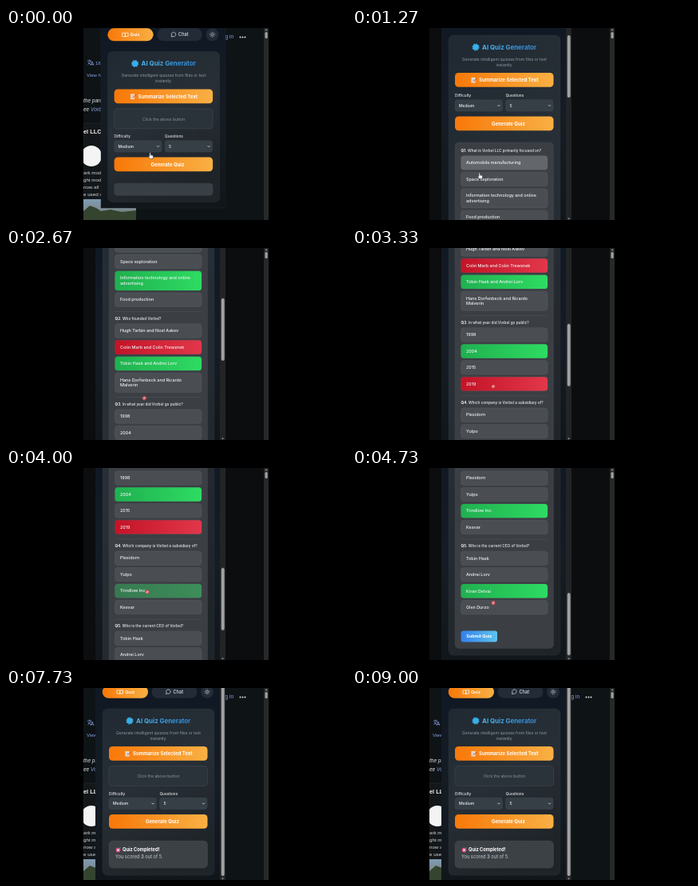
Write an HTML page that moves like this. It is 426x240 px and loops after 9070 ms.

```html
<!DOCTYPE html>
<html lang="en">
<head>
<meta charset="utf-8">
<title>Quiz popup</title>
<style>
  html, body { margin: 0; width: 100%; height: 100%; overflow: hidden; background: #000; }
  svg { display: block; width: 100%; height: 100%; }
  text { font-family: Inter, "Open Sans", sans-serif; white-space: pre; }
  .page text { font-family: "Liberation Sans", Arial, sans-serif; }
  .soft { filter: blur(.35px); }
</style>
</head>
<body>
<svg id="stage" viewBox="0 0 426 240">
  <defs>
    <linearGradient id="orange"><stop stop-color="#f87808"/><stop offset="1" stop-color="#f9b044"/></linearGradient>
    <linearGradient id="green"><stop stop-color="#20b050"/><stop offset="1" stop-color="#2edc62"/></linearGradient>
    <linearGradient id="red"><stop stop-color="#c31327"/><stop offset="1" stop-color="#e2374a"/></linearGradient>
    <linearGradient id="blue"><stop stop-color="#3480ea"/><stop offset="1" stop-color="#5cc4ee"/></linearGradient>
    <linearGradient id="title"><stop stop-color="#48b4ee"/><stop offset="1" stop-color="#2f86d4"/></linearGradient>
    <linearGradient id="panel" x2="0" y2="1"><stop stop-color="#101824"/><stop offset=".5" stop-color="#151c24"/><stop offset="1" stop-color="#11161b"/></linearGradient>
    <linearGradient id="card" x2=".4" y2="1"><stop stop-color="#202932"/><stop offset=".5" stop-color="#282f36"/><stop offset="1" stop-color="#1f2429"/></linearGradient>
    <linearGradient id="photo" x2="0" y2="1"><stop stop-color="#7f9bb4"/><stop offset=".5" stop-color="#7d8c90"/><stop offset="1" stop-color="#39452f"/></linearGradient>
    <clipPath id="window"><rect x="97" width="232" height="240"/></clipPath>
  </defs>
</svg>
<script>
const LOOP = 9070, QUIZ_AT = 830, RESULT_AT = 5700;
let css = '';

// Adds a looping keyframe track and returns the style that uses it.
function track(name, points, toCss, timing = 'linear') {
  const all = [...points, [LOOP, points[points.length - 1][1]]];
  const steps = all.map(([ms, v]) => `${(ms / LOOP * 100).toFixed(3)}%{${toCss(v)}}`);
  css += `@keyframes ${name}{${steps.join('')}}`;
  return `style="animation:${name} ${LOOP}ms ${timing} infinite"`;
}
const fade = v => `opacity:${v}`;
const shiftY = y => `transform:translateY(${y}px)`;
const move = ([x, y]) => `transform:translate(${x}px,${y}px)`;
const shown = (name, spans) =>
  track(name, [[0, 0], ...spans.flatMap(([a, b]) => [[a, 1], [b, 0]])]
    .filter(([ms], i) => i || spans[0][0] > 0), fade, 'step-end');

const rect = (x, y, w, h, r, fill, more = '') =>
  `<rect x="${x}" y="${y}" width="${w}" height="${h}" rx="${r}" fill="${fill}" ${more}/>`;
const label = (x, cy, str, size, fill = '#e8eaec', more = '') =>
  `<text x="${x}" y="${cy + size * .36}" font-size="${size}" fill="${fill}" ${more}>${str}</text>`;
const path = (d, stroke, width = .7) =>
  `<path d="${d}" fill="none" stroke="${stroke}" stroke-width="${width}"/>`;
const BOLD = 'font-weight="700"', MEDIUM = 'font-weight="500"', MID = 'text-anchor="middle"';

function browserPage() {
  const lines = ['ark mode', 'ght mode', 'now all', 'e used si']
    .map((s, i) => label(97, 181 + i * 9, s, 6.2, '#d4d6d8')).join('');
  return rect(97, 0, 226, 240, 0, '#0e1316') +
    path('M102 41h5m-2.5-1.5v1.5m2 0q-1 3-4 4.5m.3-3q1 2 3 3M106 47l2-5 2 5m-3.3-1.5h2.6', '#7f97d8', .8) +
    label(112, 43.5, '18', 6, '#88a3e8') +
    label(101, 59, 'View hi', 6, '#88a3e8') +
    label(97, 91, 'the pare', 6.5, '#e0e2e4', 'font-style="italic"') +
    label(97, 102, 'ee <tspan fill="#88a3e8">Vorb</tspan>', 6.5, '#e0e2e4', 'font-style="italic"') +
    rect(97, 119, 26, 105, 0, '#13171a', 'stroke="#2a3035" stroke-width=".5"') +
    label(97, 129, 'el LLC', 7.4, '#eceeef', BOLD) +
    '<circle cx="107" cy="160" r="13" fill="#f4f4f4"/>' + lines +
    rect(97, 214, 66, 26, 0, 'url(#photo)') +
    '<path d="M97 229l8-7 8 3 6 4 12-2 14 3 18-2v12H97z" fill="#35442f"/>' +
    label(274.5, 11, 'g in', 6.6, '#88a3e8') +
    [293.5, 296.5, 299.5].map(x => `<circle cx="${x}" cy="11.5" r="1" fill="#dfe1e3"/>`).join('');
}

function header() {
  return rect(120.7, -3.2, 57.3, 16, 8, 'url(#orange)') +
    path('M139 2.7h3q.7 0 .7.7v4.3q0-.7-.7-.7h-3zM146.5 2.7h-3q-.7 0-.7.7v4.3q0-.7.7-.7h3z', '#fff') +
    label(149, 4.9, 'Quiz', 5.4, '#fff', 'font-weight="600"') +
    rect(182.5, -3.2, 57, 16, 8, '#222b36') +
    path('M200.500 7.5l.5-1.7a2.7 2.7 0 1 1 1.3 1.2z', '#dfe3e8') +
    label(209.5, 4.9, 'Chat', 5.6, '#dfe3e8', MEDIUM) +
    '<circle cx="252" cy="4.8" r="8" fill="#222b36"/>' +
    '<circle cx="252" cy="4.8" r="1.5" fill="none" stroke="#dfe3e8" stroke-width=".7"/>' +
    '<circle cx="252" cy="4.8" r="3.1" fill="none" stroke="#dfe3e8" stroke-dasharray=".7 1.735"/>';
}

function select(x, y, name, value) {
  return label(x, y - 12.5, name, 4.7, '#e4e7ea', MEDIUM) +
    rect(x, y - 7.2, 59.5, 14.2, 3, '#363e46', 'stroke="#444c53" stroke-width=".4"') +
    label(x + 5, y, value, 5, '#f0f2f3', MEDIUM) +
    path(`M${x + 53.5} ${y - .8}l1.5 1.5 1.5-1.5`, '#dfe3e6', .8);
}

function form(cardEnd, withDropBox) {
  const up = withDropBox ? 0 : -30.5;
  return header() +
    rect(121, 26, 140, cardEnd - 26, 6, 'url(#card)', 'stroke="#2d353c" stroke-width=".4"') +
    '<circle cx="155" cy="41" r="3.8" fill="#38aee8"/>' +
    '<circle cx="155" cy="41" r="4" fill="none" stroke="#38aee8" stroke-width="1.2" stroke-dasharray="1.5 1.64"/>' +
    label(163, 41, 'AI Quiz Generator', 7.9, 'url(#title)', BOLD) +
    label(191, 56, 'Generate intelligent quizzes from files or text', 5, '#929ba4', MID) +
    label(191, 63, 'instantly.', 5, '#929ba4', MID) +
    rect(129, 73, 123.5, 17.8, 4.5, 'url(#orange)') +
    rect(149.5, 79, 5, 6.5, .6, '#eee3d4') + path('M150.5 81h3m-3 1.5h3m-3 1.5h2', '#8a96a5', .5) +
    path('M152.5 84l3.5-4', '#d5413b', .9) +
    label(159, 82, 'Summarize Selected Text', 6, '#fff', BOLD) +
    (withDropBox ? rect(129, 97.5, 123.5, 24.8, 4, '#2b333a', 'stroke="#535c64" stroke-width=".6" stroke-dasharray="1.5 1"') +
      label(191, 110.2, 'Click the above button', 5, '#89929b', MID) : '') +
    `<g transform="translate(0 ${up})">` +
    select(129, 144.5, 'Difficulty', 'Medium') + select(192.5, 144.5, 'Questions', '5') +
    rect(129, 158, 123.5, 17.8, 4.5, 'url(#orange)') +
    '<path d="M169 163.5l-2.5 4h1.7l-1 3.5 3.3-4.5h-2z" fill="#e8952c"/>' +
    label(175, 167, 'Generate Quiz', 6, '#fff', BOLD) + '</g>';
}

const questions = [
  { at: 1620, ask: 'What is Vorbel LLC primarily focused on?', right: 2,
    options: ['Automobile manufacturing', 'Space exploration', 'Information technology and online|advertising', 'Food production'] },
  { at: 2350, ask: 'Who founded Vorbel?', right: 2, wrong: 1,
    options: ['Hugh Tarbin and Noel Askev', 'Colin Marb and Colin Trewznek', 'Tobin Hask and Andrei Lorv', 'Hans Dorfenbeck and Ricardo|Malverin'] },
  { at: 3150, ask: 'In what year did Vorbel go public?', right: 1, wrong: 3,
    options: ['1998', '2004', '2015', '2019'] },
  { at: 3920, ask: 'Which company is Vorbel a subsidiary of?', right: 2,
    options: ['Plexidorn', 'Yulpo', 'Trindlow Inc.', 'Kesvar'] },
  { at: 4520, ask: 'Who is the current CEO of Vorbel?', right: 2,
    options: ['Tobin Hask', 'Andrei Lorv', 'Kiran Delvai', 'Glen Durzo'] },
];

function quizBody() {
  let out = rect(129, 160, 123.5, 552.5, 5, '#3b3f44', 'stroke="#44494e" stroke-width=".4"');
  let y = 170.4;
  questions.forEach((q, n) => {
    const marked = track('answer' + n, [[0, 0], [q.at, 0], [q.at + 180, 1]], fade);
    if (n) out += rect(136.5, y - 9, 108, .5, 0, '#53585d');
    out += label(136.5, y, `<tspan ${BOLD}>Q${n + 1}.</tspan> ${q.ask}`, 4.7, '#eceef0', MEDIUM);
    let top = y + 6.4;
    q.options.forEach((option, i) => {
      const lines = option.split('|'), h = lines.length > 1 ? 24.2 : 17.4;
      out += rect(136.5, top, 108.5, h, 3.5, '#4a4e53', 'stroke="#575c61" stroke-width=".5"');
      if (!n && !i) out += rect(136.5, top, 108.5, h, 3.5, '#666a6f',
        track('hover', [[0, 0], [1020, 0], [1130, 1], [1260, 1], [1400, 0]], fade));
      const tone = i === q.right ? 'green' : i === q.wrong ? 'red' : '';
      if (tone) out += rect(136.5, top, 108.5, h, 3.5, `url(#${tone})`, marked);
      lines.forEach((s, k) => {
        out += label(143, top + h / 2 - .2 + (k - (lines.length - 1) / 2) * 6.7, s, 5.4, '#f2f3f4', MEDIUM);
      });
      top += h + 3.05;
    });
    y = top + 12;
  });
  return out + rect(136.5, 690.5, 45.5, 14, 3, 'url(#blue)') +
    label(159.3, 697.4, 'Submit Quiz', 5.4, '#fff', `${BOLD} ${MID}`);
}

function scrollTrack() {
  return rect(268, 0, 7, 240, 0, '#222426') + '<path d="M270 237.5h3l-1.5 2z" fill="#9a9c9e"/>';
}

function result() {
  return rect(129, 191, 123.5, 34, 5, '#3c4146', 'stroke="#494f54" stroke-width=".4"') +
    '<circle cx="140.5" cy="202.5" r="2.9" fill="#e0457c"/><circle cx="140.5" cy="202.5" r="1.5" fill="#f3d5e0"/>' +
    path('M140.5 202.5l3-3', '#4aa5e0', .8) +
    label(146, 202.3, 'Quiz Completed!', 5.7, '#fff', BOLD) +
    label(137, 210.5, `You scored <tspan ${BOLD}>3</tspan> out of 5.`, 5.7, '#b4babf', MEDIUM);
}

function cursor() {
  const at = track('pointer', [
    [0, [181, 159.6]], [500, [181, 166]], [850, [176, 168]], [1270, [160, 184.500]], [1500, [168, 213]], [1720, [168, 213]],
    [2070, [171, 159]], [2280, [172, 193]], [2550, [172, 193]], [3000, [177, 173]], [3500, [177, 173]],
    [3820, [177, 155]], [4560, [177, 155]], [4730, [177, 168.5]], [5150, [160, 210]], [5600, [160, 210]],
    [6000, [167, 212]], [6700, [167, 212]], [7100, [190, 250]]], move);
  const blocked = [[1620, 2130], [2350, 2750], [3150, 3560], [3920, 4220], [4520, 4900]];
  const hand = [0, ...blocked.map(b => b[1])].map((from, i) => [from, blocked[i] ? blocked[i][0] : RESULT_AT]);
  return `<g ${at}>
    <path ${shown('hand', hand)} d="M-1.2-3.5q.8-.8 1.5 0v2.6l2.6.6q.8.3.7 1.2l-.5 2.9h-3.6l-2.4-2.7q.3-1 1.7-.2z" fill="#fff" stroke="#111" stroke-width=".5"/>
    <g ${shown('blocked', blocked)}><circle r="2.1" fill="#f4e9e9" stroke="#d3383c"/>${path('M-1.5-1.5l3 3', '#d3383c', 1)}</g>
    <g ${shown('beam', [[RESULT_AT, 7100]])}>${path('M-1.3-3h2.6M0-3v6m-1.3 0h2.6', '#e8e8e8')}</g></g>`;
}

const scroll = [[0, 0], [1000, 0], [1200, 17], [1750, 17], [2030, 120], [2550, 120], [2850, 291],
  [3520, 291], [3760, 387], [4150, 387], [4420, 487]];
const scrolled = track('scroll', scroll, s => shiftY(-s));
const thumb = track('thumb', scroll, s => shiftY(3.7 + .313 * s));

document.getElementById('stage').innerHTML += `<g clip-path="url(#window)"><g class="soft">
  ${rect(97, 0, 226, 240, 0, '#0c0d0e')}
  <g class="page" ${shown('page', [[0, QUIZ_AT], [RESULT_AT, LOOP]])}>${browserPage()}</g>
  ${rect(323, 0, 6, 240, 0, '#272929')}${rect(324.5, 5, 3.2, 8, 1.5, '#a0a2a3')}
  <path d="M324.6 3.3h3l-1.5-2.2z" fill="#a0a2a3"/>
  <g ${shown('start', [[0, QUIZ_AT]])}>
    ${rect(119, -4, 156, 229, 0, 'url(#panel)', 'stroke="#1d252d" stroke-width=".4"')}
    <g transform="translate(6.6 3.5)">${form(214, true)}${rect(129, 190.7, 123.5, 15, 4, '#383f45', 'stroke="#444b51" stroke-width=".4"')}</g>
  </g>
  <g ${shown('quiz', [[QUIZ_AT, RESULT_AT]])}>
    ${rect(112, 0, 156, 240, 0, 'url(#panel)')}
    <g ${scrolled}>${form(721, false)}${quizBody()}</g>
    ${scrollTrack()}<g ${thumb}>${rect(269.7, 0, 4, 78, 2, '#a0a2a3')}</g>
  </g>
  <g ${shown('done', [[RESULT_AT, LOOP]])}>
    ${rect(112, 0, 156, 240, 0, 'url(#panel)')}${form(234, true)}${result()}
    ${scrollTrack()}${rect(269.7, -4, 4, 239, 2, '#a0a2a3')}
  </g>
  ${cursor()}</g></g>`;
document.head.appendChild(document.createElement('style')).textContent = css;
</script>
</body>
</html>
```
